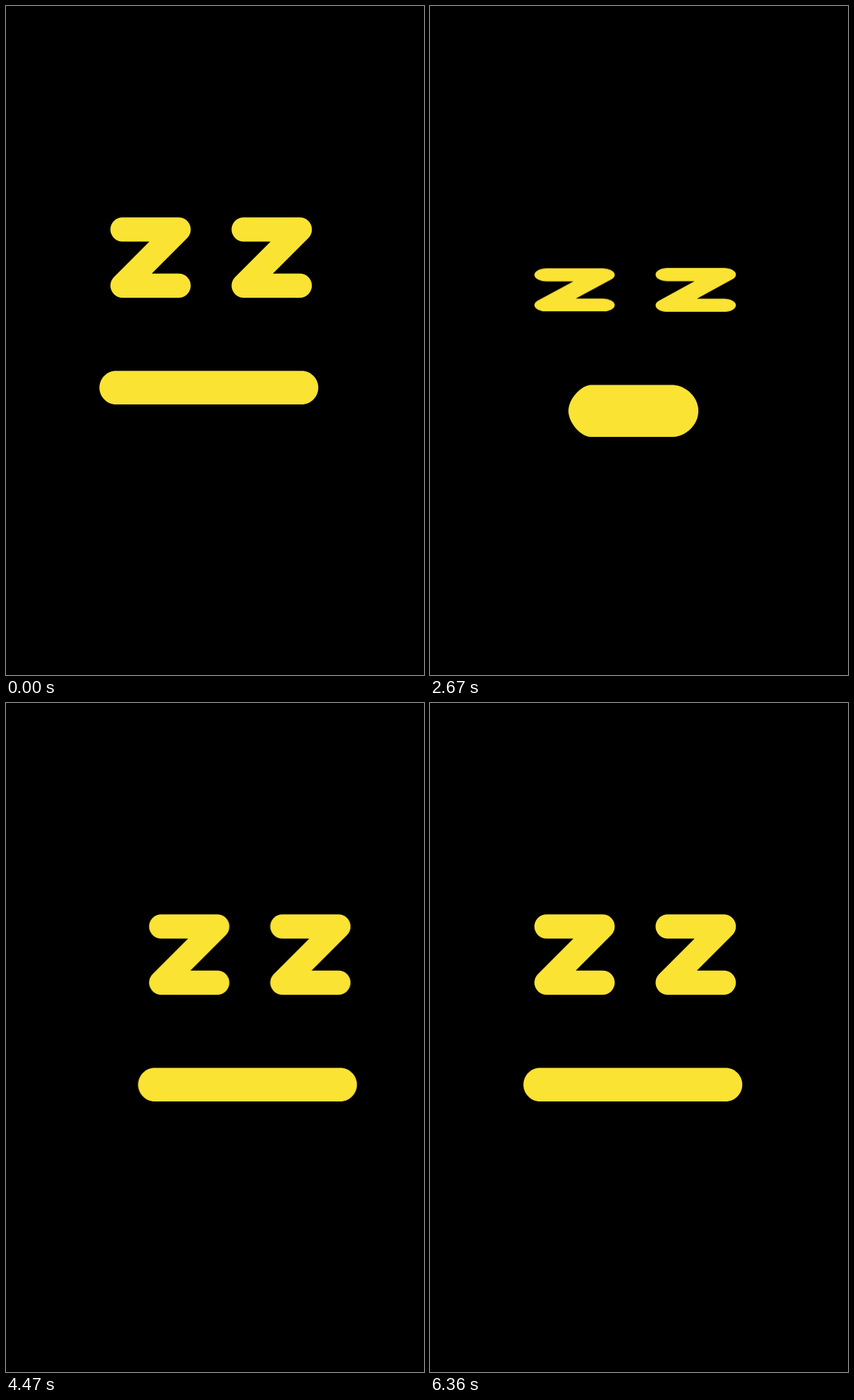
Animation, 592 px wide and 947 px high, one loop 7080 ms. Source, as an HTML page:

```html
<!DOCTYPE html>
<html lang="en">
<head>
<meta charset="utf-8">
<title>Sleepy face</title>
<style>
  html, body { margin: 0; width: 100%; height: 100%; overflow: hidden; background: #000; }
  svg { display: block; width: 100vw; height: 100vh; }

  .look, .sink, .lids, .left, .right, .mouth {
    animation: 7080ms cubic-bezier(.333, 0, .667, 1) infinite;
  }
  .look { animation-name: look; }
  .sink { animation-name: sink; }
  .lids { animation-name: lids; }
  .left { animation-name: left; }
  .right { animation-name: right; }
  .mouth { animation-name: yawn; fill: #fbe334; }
  .lids, .left, .right { transform-origin: 0 356px; }
  .z { fill: none; stroke: #fbe334; stroke-width: 34.3; stroke-linecap: round; stroke-linejoin: round; }

  /* glance right, left, back to the middle */
  @keyframes look {
    0%, 50.847% { transform: translateX(0); }
    55.508%, 65.254% { transform: translateX(54.7px); }
    75.932% { transform: translateX(-49.8px); }
    82.203%, 100% { transform: translateX(0); }
  }

  /* the head nods down, then snaps up */
  @keyframes sink {
    0%, 55.508%, 100% { transform: translateY(0); }
    50.847% { transform: translateY(55px); }
  }

  /* both eyes: falling asleep, then three blinks */
  @keyframes lids {
    0% { transform: scaleY(1); }
    27.119% { transform: scaleY(1); animation-timing-function: cubic-bezier(.33, 0, .9, 1); }
    50.847% { transform: scaleY(.064); }
    55.508%, 58.475% { transform: scaleY(1); }
    60.805% { transform: scaleY(.225); }
    63.136%, 80.508% { transform: scaleY(1); }
    82.839% { transform: scaleY(.225); }
    85.169% { transform: scaleY(1); }
    87.5% { transform: scaleY(.225); }
    89.831%, 100% { transform: scaleY(1); }
  }

  /* each eye fights sleep in its own rhythm */
  @keyframes left {
    0% { transform: scaleY(1); }
    14.407% { transform: scaleY(.345); }
    27.119%, 50.847% { transform: scaleY(.776); }
    55.508%, 100% { transform: scaleY(1); }
  }
  @keyframes right {
    0%, 8.475% { transform: scaleY(1); }
    16.949% { transform: scaleY(.67); }
    20.763% { transform: scaleY(.858); }
    27.119%, 50.847% { transform: scaleY(.79); }
    55.508%, 100% { transform: scaleY(1); }
  }

  @keyframes yawn {
    0% {
      d: path("M156 516.6H418.5C431.6 516.6 442.3 527.2 442.3 540.3C442.3 553.4 431.6 564.1 418.5 564.1H156C142.9 564.1 132.3 553.4 132.3 540.3C132.3 527.2 142.9 516.6 156 516.6Z");
      animation-timing-function: cubic-bezier(.8, 0, .49, 1);
    }
    50.847% {
      d: path("M240 485.6H331.5C349 487 368.7 503 368.7 524.8C368.7 546.6 349 562.7 331.5 564.1H240C227 563 207.7 543 207.7 524.8C207.7 506.6 227 486.7 240 485.6Z");
    }
    55.508%, 100% {
      d: path("M156 516.6H418.5C431.6 516.6 442.3 527.2 442.3 540.3C442.3 553.4 431.6 564.1 418.5 564.1H156C142.9 564.1 132.3 553.4 132.3 540.3C132.3 527.2 142.9 516.6 156 516.6Z");
    }
  }
</style>
</head>
<body>
<svg viewBox="0 0 592 947">
  <g class="look">
    <g class="sink">
      <g class="lids">
        <g class="left"><path class="z" d="M165 316.3H244.5L165 395.8H244.5"/></g>
        <g class="right"><path class="z" d="M336.6 316.3H416.1L336.6 395.8H416.1"/></g>
      </g>
      <path class="mouth" d="M156 516.6H418.5C431.6 516.6 442.3 527.2 442.3 540.3C442.3 553.4 431.6 564.1 418.5 564.1H156C142.9 564.1 132.3 553.4 132.3 540.3C132.3 527.2 142.9 516.6 156 516.6Z"/>
    </g>
  </g>
</svg>
</body>
</html>
```
